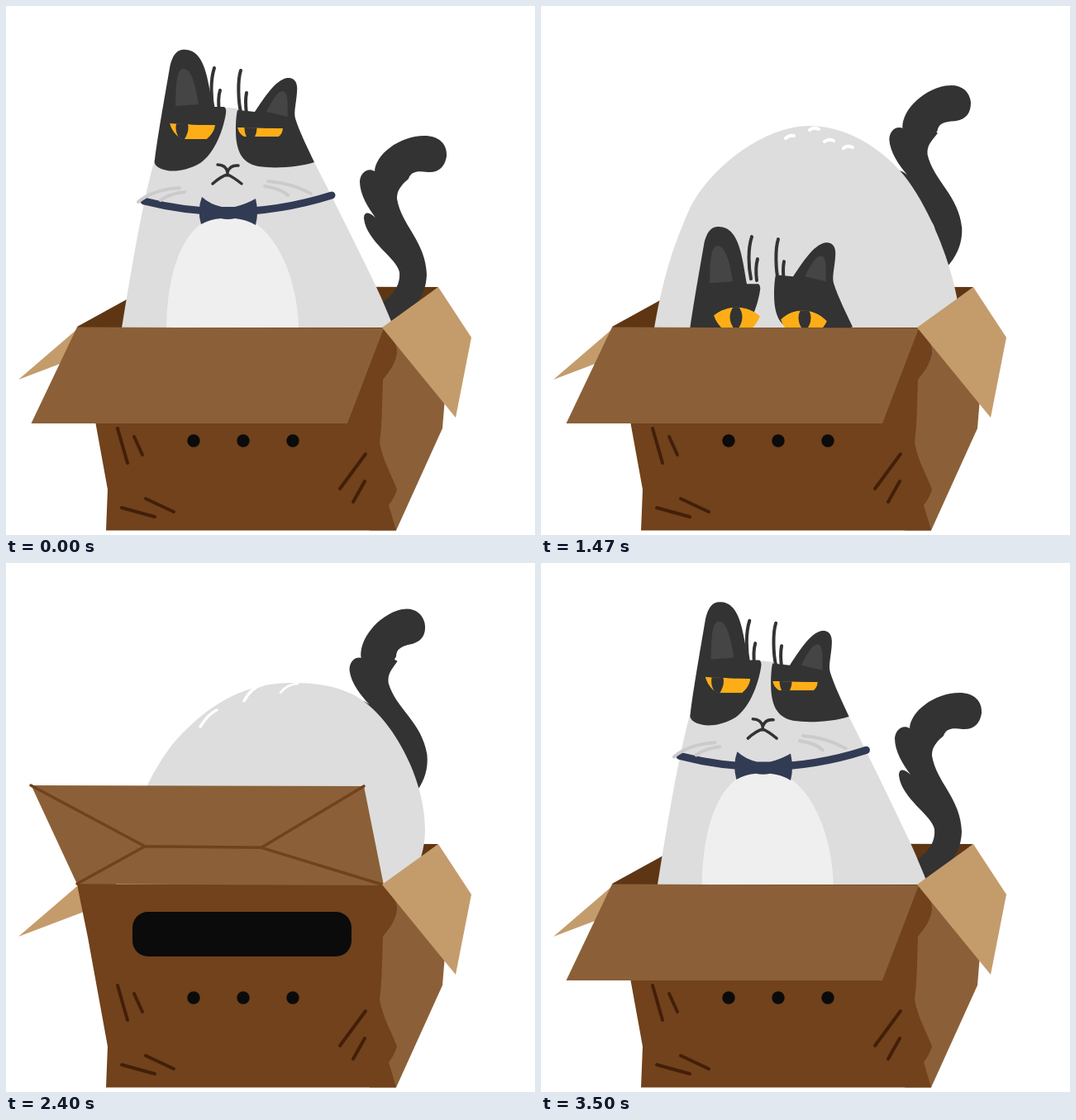
Animation, 640 px wide and 640 px high, one loop 3580 ms. Source, as an HTML page with a canvas:

```html
<!DOCTYPE html>
<html lang="en">
<head>
<meta charset="utf-8">
<title>Cat in a box</title>
<style>
  html, body { margin: 0; width: 100%; height: 100%; overflow: hidden; background: #fff; }
  canvas { display: block; width: 640px; height: 640px; }
</style>
</head>
<body>
<canvas id="stage" width="640" height="640"></canvas>
<script>
const c = document.getElementById('stage').getContext('2d');
const LOOP = 3580, FLOOR = 635, HINGE = 389;
const DARK = '#333', BROWN = '#71421b', TAN = '#8b6038', LIGHT = '#c49c6c',
      AMBER = '#fdae17', NAVY = '#323b54', GREY = '#ddd', INK = '#0b0b0b';

// Time rules, all in ms of the loop
let t = 0;
const ramp = (a, b) => {
  const x = Math.min(1, Math.max(0, (t - a) / (b - a)));
  return x * x * (3 - 2 * x);
};
const hold = (a, b, d, e) => ramp(a, b) - ramp(d, e);
const bump = (a, peak, b) => hold(a, peak, peak, b);

const tailLift = () => -(17 * ramp(0, 400) + 74 * ramp(1130, 1800)) * (1 - ramp(3000, 3420));
const tailSwing = () => -.11 * bump(0, 450, 1100) + .05 * bump(950, 1130, 1300) - .065 * bump(1250, 1450, 1650)
  + .11 * bump(1560, 1800, 2000) - .12 * hold(1900, 2200, 2750, 3500);
const stretch = () => 1 + .119 * (bump(1030, 1190, 1340) + bump(3160, 3310, 3560));
const curl = () => hold(1190, 1430, 3110, 3300) + hold(1490, 1780, 2900, 3110);
const dive = () => 426 * hold(1200, 1740, 2980, 3300);
const eyeOpen = () => 1 - hold(570, 850, 980, 1090);
const eyeWide = () => hold(930, 980, 1900, 2000);
const gaze = () => 23 * hold(60, 480, 1900, 2000);
const squash = () => 1 - .16 * bump(1490, 1650, 2015) - .0615 * bump(2900, 3050, 3360);
const flapUp = () => 2 * hold(1540, 1917, 3020, 3299) - 1;
const sideUp = () => 1.45 * bump(1490, 1660, 2042) - .15 * bump(2900, 3140, 3350);
const peekY = () => 365 + 84 * hold(1650, 1945, 2800, 2940);
const peekOpen = () => 1 - hold(2300, 2380, 2430, 2520);

const lerp = (a, b, k) => a + (b - a) * k;
const blend = (a, b, k) => {
  const to = b.match(/-?[\d.]+/g);
  let i = 0;
  return a.replace(/-?[\d.]+/g, v => lerp(+v, +to[i++], k).toFixed(2));
};
const fill = (d, color) => { c.fillStyle = color; c.fill(new Path2D(d)); };
const line = (d, color, w) => { c.strokeStyle = color; c.lineWidth = w; c.stroke(new Path2D(d)); };
const poly = (color, ...pts) => fill('M' + pts.join('L') + 'Z', color);
const group = draw => { c.save(); draw(); c.restore(); };
const spin = (x, y, a) => { c.translate(x, y); c.rotate(a); c.translate(-x, -y); };
const lens = (x, y, w, h) =>
  `M${x},${y - h}Q${x + 2 * w},${y - h * .1} ${x},${y + h}Q${x - 2 * w},${y - h * .1} ${x},${y - h}Z`;

// Sitting, bent over, head in the box
const sit = 'M132,440C148,340 163,245 180,185C188,150 225,123 270,123C310,127 345,140 373,189C395,232 420,282 448,340C455,355 475,400 488,440Z';
const bent = 'M130,440C142,340 160,290 180,245C205,195 270,145 325,145C375,145 425,180 450,220C475,258 495,310 503,352C505,370 506,400 506,440Z';
const egg = 'M124,440C142,320 172,255 205,215C250,165 295,145 345,145C375,145 395,148 415,157C460,175 507,255 507,322C507,370 480,405 440,440Z';

const leftEye = {
  x: 213, y: 148, low: 161, slide: -12,
  half: 'M198,142C215,143 240,144 253,144C253,150 248,157 243,161C235,161 220,161 213,161C206,158 200,150 198,142Z',
  wide: 'M209,148C225,135 250,135 265,149C262,157 256,164 252,167C240,170 226,168 221,166C215,160 211,155 209,148Z'
};
const rightEye = {
  x: 296, y: 149, low: 158, slide: 1,
  half: 'M280,147C300,147 320,148 335,148C335,152 333,156 330,158C315,158 300,158 288,158C284,156 281,152 280,147Z',
  wide: 'M290,153C305,138 330,138 346,155C343,162 337,168 333,170C320,173 308,172 302,170C296,165 292,160 290,153Z'
};

function tail() {
  const a = tailSwing();
  group(() => {
    c.translate(0, tailLift());
    spin(495, 320, a);
    fill('M440,366C462,358 478,342 476,322C473,305 436,285 433,257C433,249 438,248 447,256C438,244 428,228 428,212' +
         'C429,201 438,195 446,200L470,196L487,208C478,218 473,222 473,233C478,265 508,285 509,325C508,358 485,376 450,402Z', DARK);
    spin(455, 210, a * 1.8);
    fill('M446,201C446,180 476,157 506,157C524,157 534,167 533,182C531,194 524,202 510,201C496,199 490,201 487,209C475,222 450,220 446,201Z', DARK);
  });
}

function eye(e) {
  const open = eyeOpen(), wide = eyeWide();
  if (open < .03) return;
  group(() => {
    c.translate(e.slide * bump(2900, 3140, 3290), e.low * (1 - open));
    c.scale(1, open);
    const shape = blend(e.half, e.wide, wide);
    c.clip(new Path2D(shape));
    fill(shape, AMBER);
    fill(lens(e.x + gaze(), e.y + 3 * wide, 7.5, 17), DARK);
  });
}

function face() {
  const y = dive(), lean = y / 213, down = t < 2200;
  const part = (k, dx, draw) => group(() => { c.translate(dx * lean, y * k); draw(); });
  part(1, -1, () => {
    fill('M194,440V389C195,320 215,253 270,252C320,254 352,320 354,389V440Z', '#efefef');
    line('M167,236Q280,265 394,229', NAVY, 9);
    fill('M237,231Q247,240 261,243H277Q292,239 302,233Q306,250 302,265Q290,258 277,257Q268,259 260,257Q247,258 236,264Q231,247 237,231Z', NAVY);
    line('M160,237Q178,222 210,220M187,235Q198,227 216,225M317,212Q345,214 369,227M313,218Q333,221 341,229', '#cbcbcb', 4);
    line('M256,192Q266,192 268,201Q271,192 281,193M268,200V205M250,215Q260,206 268,204Q275,207 285,215', DARK, 3.5);
    fill('M180,186C183,160 192,110 198,75C202,55 210,52 218,53C232,54 239,68 243,85C247,102 248,112 250,122H264Q267,124 266,130' +
         'C262,155 250,180 235,190C222,198 205,201 195,199C184,197 178,192 180,186Z', DARK);
    fill('M205,121C206,100 205,76 215,76C225,76 230,100 233,119Z', '#454545');
  });
  part(down ? .93 : .99, 4, () => {
    fill('M280,126L301,128C312,112 325,90 340,87C352,86 353,97 352,105C351,118 348,128 350,136C355,152 365,172 373,189' +
         'C355,195 325,197 305,194C285,190 278,175 278,150C278,138 279,130 280,126Z', DARK);
    fill('M315,128C322,115 328,103 335,103C343,104 340,125 341,134Z', '#454545');
  });
  part(down ? .953 : .845, 3, () =>
    line('M252,75C247,90 248,112 251,126M259,102Q256,112 258,128M284,78C280,90 281,115 284,128M291,105Q289,115 291,130', DARK, 4));
  part(1.056, 0, () => [leftEye, rightEye].forEach(eye));
}

function cat() {
  const v = stretch(), m = curl();
  c.beginPath();
  c.rect(0, 0, 640, 480);
  c.clip();
  c.translate(304, HINGE);
  c.scale(1 - (v - 1) * .35, v);
  c.translate(-304, -HINGE);
  fill(m < 1 ? blend(sit, bent, m) : blend(bent, egg, m - 1), GREY);
  c.lineCap = 'round';
  if (m > 1.5) {
    line('M235,198Q245,182 255,178M288,167Q297,150 311,147', '#fff', 3.5);
    line('M332,157Q339,147 353,146', '#fff', 2.5);
  } else if (m > .85) {
    line('M296,160Q300,156 306,157M325,150Q329,146 336,149M343,164Q348,160 354,163M366,172Q370,168 377,171', '#fff', 4);
  }
  face();
}

const slot = new Path2D();
slot.roundRect(153, 422, 265, 54, 19);

function disc(x, y, rx, ry, color) {
  c.fillStyle = color;
  c.beginPath();
  c.ellipse(x, y, rx, ry, 0, 0, 7);
  c.fill();
}

function peek() {
  c.clip(slot);
  for (const x of [230, 338.5]) group(() => {
    c.translate(x, peekY());
    c.scale(1, peekOpen());
    disc(0, 0, 37, 40.5, AMBER);
    fill(lens(0, 0, 11, 32), DARK);
  });
}

function inBox(draw) {
  group(() => {
    const s = squash();
    c.translate(0, FLOOR * (1 - s));
    c.scale(1, s);
    draw();
  });
}

function boxBack() {
  const q = sideUp(), up = Math.max(q, 0);
  poly(LIGHT, [86, 391 - 22 * up], [q < 0 ? 15 - 45 * q : 15 + 2 * q, 452 - 43 * up], [110, 416 - 35 * up]);
  poly('#5f3613', [86, 388], [175, 339], [523, 340], [455, 396], [90, 396]);
}

function frontPanel() {
  poly(TAN, [456, 390], [537.5, 396], [528, 511], [472, 634.5], [440, 634.5]);
  fill('M86,389H457C465,398 474,408 473,420C471,433 464,442 456,452C455,480 455,508 452,528C456,551 468,570 473,585' +
       'Q469,597 463,604Q467,617 472,634.5H121L123,585L99,453Z', BROWN);
  c.lineCap = 'round';
  line('M135,511L147,553M155,521L165,543M140,607L180,618M169,596L203,612M435,542L404,584M434,575L420,600', '#431f09', 4);
  c.fillStyle = INK;
  c.fill(slot);
  for (let i = 0; i < 3; i++) disc(227 + 60 * i, 526, 7.7, 7.7, INK);
  group(peek);
}

function frontFlap() {
  const k = flapUp(), y = HINGE - k * (k > 0 ? 120 : 116), right = 433 + 20 * Math.min(k, 0);
  poly(TAN, [86, 388.5], [30.5, y], [right, y + (k > 0 ? 1 : 0)], [457, 390]);
  if (k <= 0) return;
  const fold = lerp(HINGE, y, .385);
  line(`M30,${y}L168,${fold}L309,${fold + 1.5}L433,${y + 1}M86,388L168,${fold}M309,${fold + 1.5}L455,389`, BROWN, .5 + 3 * k);
}

function sideFlap() {
  const q = sideUp(), up = Math.max(q, 0), sag = Math.min(q, 0);
  poly(LIGHT, [455, 389], [523, 340],
    [563 + 5 * up + 26 * sag, 401 - 41 * up - 80 * sag],
    [544 + 24 * up + 20 * sag, 498 - 90 * up - 45 * sag]);
}

const start = performance.now();
function frame() {
  t = (performance.now() - start) % LOOP;
  c.fillStyle = '#fff';
  c.fillRect(0, 0, 640, 640);
  inBox(boxBack);
  tail();
  group(cat);
  inBox(() => { frontPanel(); frontFlap(); sideFlap(); });
  requestAnimationFrame(frame);
}
frame();
</script>
</body>
</html>
```
